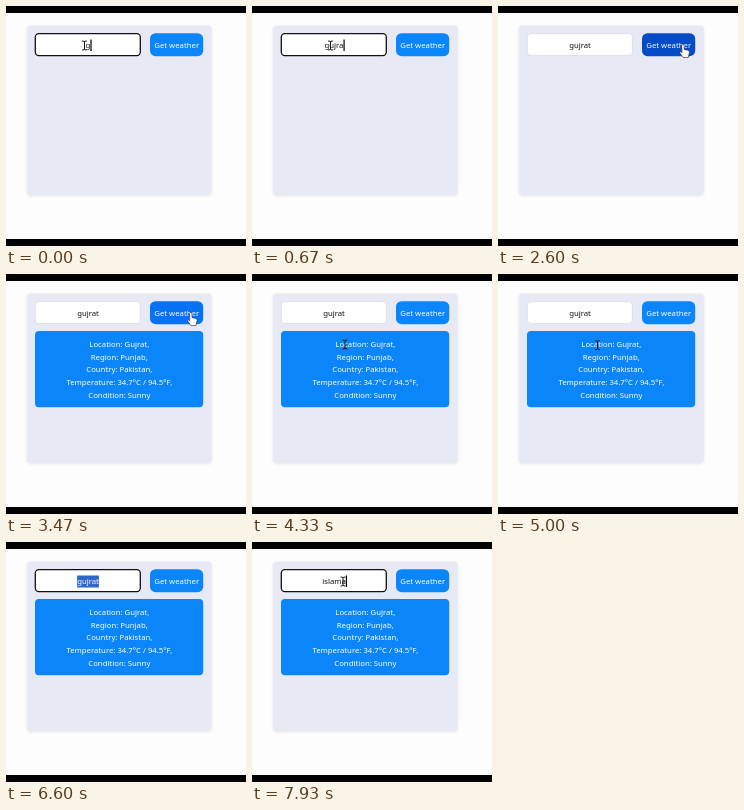
Write an HTML page that moves like this. It is 240 px wide and 240 px high and loops after 8 s.

```html
<!DOCTYPE html>
<html lang="en">
<head>
<meta charset="utf-8">
<title>Weather lookup</title>
<style>
  html, body { margin: 0; height: 100%; overflow: hidden; background: #000; }
  svg { display: block; width: 100vw; height: 100vh; }
  text { font: 7.75px "Noto Sans", "Open Sans", sans-serif; text-anchor: middle; fill: #fff; }
  #card { filter: drop-shadow(0 1px 1.5px rgba(60, 60, 90, .14)); }
</style>
</head>
<body>
<svg viewBox="0 0 240 240">
  <rect width="240" height="240"/>
  <rect y="7" width="240" height="226" fill="#fdfdfd"/>
  <rect id="card" x="21" y="19.5" width="184.5" height="169.2" rx="4" fill="#e7eaf4"/>

  <rect id="field" x="29.3" y="27.6" width="105" height="22" rx="3.5" fill="#fff"/>
  <rect id="selection" y="33.5" height="12" fill="#2f66cc"/>
  <text id="city" x="82" y="42.2"></text>
  <rect id="caret" y="33.5" width="1.2" height="11.5"/>

  <rect id="button" x="144" y="27.2" width="53.2" height="23" rx="5.5"/>
  <text x="170.7" y="42.2">Get weather</text>

  <g id="result">
    <rect x="29" y="57" width="168.2" height="76.2" rx="4" fill="#0a86fa"/>
  </g>

  <g id="cursor" stroke-linejoin="round" stroke-linecap="round">
    <path id="beam" d="M-2-4.5Q0-4.5 0-3.5Q0-4.5 2-4.5M0-3.5V3.5M-2 4.5Q0 4.5 0 3.5Q0 4.5 2 4.5" fill="none" stroke="#111" stroke-width="1"/>
    <path id="hand" d="M-1.2-.4Q0-2 1.2-.4V4L5.2 4.8Q6.6 5.2 6.4 7L5.3 12H.2L-3.4 7.2Q-3 5.6-1.2 6.8Z" fill="#fff" stroke="#222" stroke-width=".6"/>
    <path id="arrow" d="M0 0V9.2L2.1 7.3 3.5 10.5 4.9 9.9 3.5 6.8H6.5Z" fill="#111" stroke="#fff" stroke-width=".6"/>
  </g>
</svg>
<script>
const LOOP = 8000, PRESS = 2480, RELEASE = 2640, RESULT = 3350;
const REFOCUS = 6150, SELECT = 6330;
const el = id => document.getElementById(id);
const show = (id, on) => el(id).setAttribute("display", on ? "inline" : "none");
const set = (id, attrs) => {
  for (const name in attrs) el(id).setAttribute(name, attrs[name]);
};

["Location: Gujrat,", "Region: Punjab,", "Country: Pakistan,",
 "Temperature: 34.7°C / 94.5°F,", "Condition: Sunny"].forEach((line, i) => {
  const text = document.createElementNS("http://www.w3.org/2000/svg", "text");
  text.setAttribute("x", 113.3);
  text.setAttribute("y", 73.2 + i * 12.6);
  text.textContent = line;
  el("result").append(text);
});

const typing = [
  { word: "gujrat", start: 0, step: 140 },
  { word: "islama", start: 7070, step: 160 }
];

// time, x, y of the pointer
const route = [
  [0, 78.5, 39.5], [800, 78.5, 39.5], [1300, 161, 39.5], [1500, 161, 39.5],
  [2050, 185, 39.5], [3450, 185, 39.5], [4150, 93, 70.5], [4800, 93, 70.5],
  [5400, 118, 73], [5730, 113, 59], [6050, 91, 39.5], [LOOP, 91, 39.5]
];

function pointerAt(t) {
  const i = route.findIndex(point => point[0] > t);
  const [t0, x0, y0] = route[i - 1], [t1, x1, y1] = route[i];
  const p = (t - t0) / (t1 - t0), e = p * p * (3 - 2 * p);
  return [x0 + (x1 - x0) * e, y0 + (y1 - y0) * e];
}

const inside = (x, y, l, t, r, b) => x >= l && x <= r && y >= t && y <= b;

function draw(t) {
  const { word, start, step } = typing[t < typing[1].start ? 0 : 1];
  const count = Math.min(word.length, 1 + Math.floor((t - start) / step));
  const focused = t < PRESS || t >= REFOCUS;
  const selected = t >= SELECT && t < typing[1].start;
  const city = el("city");
  city.textContent = word.slice(0, count);
  city.style.fill = selected ? "#fff" : "#111";
  const width = city.getComputedTextLength();

  set("field", { stroke: focused ? "#111" : "#d4d7e4", "stroke-width": focused ? 1.3 : .7 });
  set("selection", { x: 82 - width / 2, width });
  show("selection", selected);

  const lastKey = t >= REFOCUS && t < typing[1].start ? REFOCUS : start + (count - 1) * step;
  set("caret", { x: 82 + width / 2 });
  show("caret", focused && !selected && (t - lastKey) % 1060 < 530);

  const [x, y] = pointerAt(t);
  const onButton = inside(x, y, 144, 27, 197.5, 50.5);
  const onField = inside(x, y, 29, 27, 135, 50);
  const onText = t >= RESULT && inside(x, y, 60, 64, 167, 127);
  const pressed = t >= PRESS && t < RELEASE;
  set("button", { fill: pressed ? "#044cc6" : onButton ? "#0872f4" : "#0a86fa" });
  show("result", t >= RESULT);

  set("cursor", { transform: `translate(${x} ${y})` });
  show("hand", onButton);
  show("beam", (onField || onText) && !selected);
  show("arrow", !onButton && !onField && !onText);
}

function tick() {
  draw(performance.now() % LOOP);
  requestAnimationFrame(tick);
}
tick();
</script>
</body>
</html>
```
